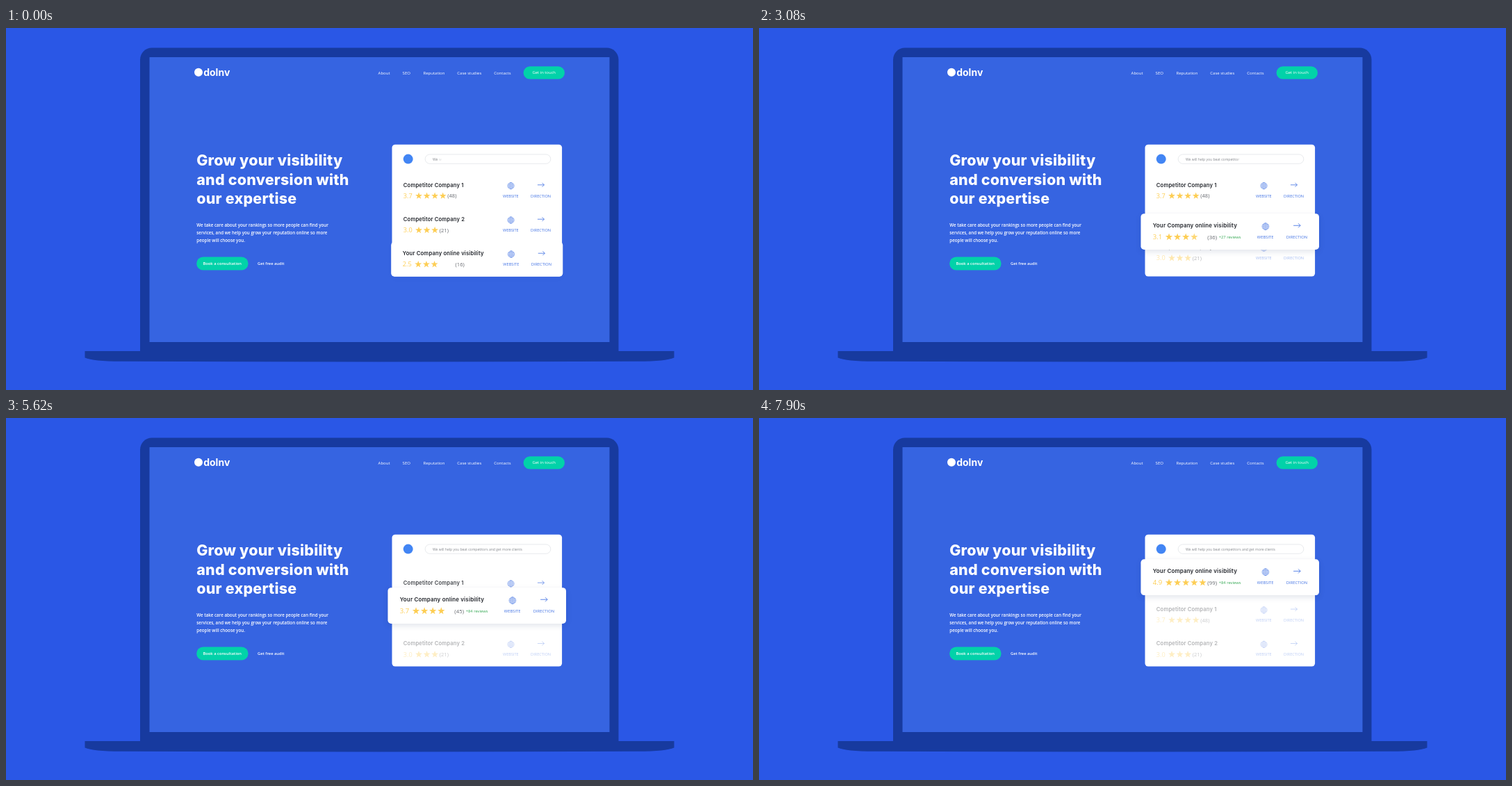
An HTML page with a canvas for the animation above (9100 ms loop, 1075 by 521 pixels).

```html
<!DOCTYPE html>
<html lang="en">
<head>
<meta charset="utf-8">
<title>Landing page on a laptop</title>
<style>
  html, body { margin: 0; width: 100%; height: 100%; overflow: hidden; background: #2a57e6; }
  canvas { display: block; width: 1075px; height: 521px; }
</style>
</head>
<body>
<canvas id="stage"></canvas>
<script>
const W = 1075, H = 521, LOOP = 9.1;
const canvas = document.getElementById('stage');
const ctx = canvas.getContext('2d');
const dpr = window.devicePixelRatio || 1;
canvas.width = W * dpr;
canvas.height = H * dpr;

const SANS = '"Open Sans", "Noto Sans", sans-serif';
const HEAD = 'Inter, "Open Sans", sans-serif';
const BLUE = '#3f70e3', GOLD = '#fdce55', GREEN = '#02d2a9', INK = '#25282e';
const QUERY = 'We will help you beat competitors and get more clients';
const MID = 677.75;        // horizontal centre of the results card
const GROWTH = 0.048;

// value over time: [seconds, value]
const SCORE = [[0, 2.5], [1.24, 2.63], [3.08, 3.13], [4.52, 3.5], [5.06, 3.6],
               [6.04, 3.82], [6.66, 4.13], [7.45, 4.8], [7.85, 4.9]];
const VOTES = [[0, 16], [1.24, 21.3], [3.08, 36.3], [4, 40.5], [4.52, 42.3],
               [5.06, 43.5], [6.04, 47.4], [6.66, 59.4], [7.4, 94], [7.85, 99]];

const clamp = x => Math.max(0, Math.min(1, x));
const linear = (t, from, to) => clamp((t - from) / (to - from));
function ease(t, from, to) {
  const x = linear(t, from, to);
  return x * x * (3 - 2 * x);
}
function sample(keys, t) {
  for (let i = 1; i < keys.length; i++) {
    const [t0, a] = keys[i - 1], [t1, b] = keys[i];
    if (t < t1) return a + (b - a) * linear(t, t0, t1);
  }
  return keys[keys.length - 1][1];
}

function text(str, x, y, size, color, o = {}) {
  ctx.font = `${o.weight || 400} ${size}px ${o.font || SANS}`;
  ctx.letterSpacing = (o.gap || 0) + 'px';
  ctx.textAlign = o.align || 'left';
  ctx.fillStyle = color;
  ctx.fillText(str, x, y);
}
function box(x, y, w, h, r, color) {
  ctx.beginPath();
  ctx.roundRect(x, y, w, h, r);
  ctx.fillStyle = color;
  ctx.fill();
}
function disc(x, y, r, color) {
  ctx.beginPath();
  ctx.arc(x, y, r, 0, Math.PI * 2);
  ctx.fillStyle = color;
  ctx.fill();
}
function star(x, y, r) {
  ctx.beginPath();
  for (let i = 0; i < 10; i++) {
    const a = i * Math.PI / 5 - Math.PI / 2, d = i % 2 ? r * 0.4 : r;
    ctx.lineTo(x + d * Math.cos(a), y + d * Math.sin(a));
  }
  ctx.closePath();
  ctx.fillStyle = GOLD;
  ctx.fill();
}
function globe(x, y, r) {
  ctx.beginPath();
  ctx.arc(x, y, r, 0, Math.PI * 2);
  ctx.moveTo(x + r * 0.5, y);
  ctx.ellipse(x, y, r * 0.5, r, 0, 0, Math.PI * 2);
  ctx.moveTo(x, y - r);
  ctx.lineTo(x, y + r);
  for (const k of [-0.45, 0, 0.45]) {
    const half = r * Math.sqrt(1 - k * k);
    ctx.moveTo(x - half, y + k * r);
    ctx.lineTo(x + half, y + k * r);
  }
  ctx.strokeStyle = BLUE;
  ctx.lineWidth = 0.5;
  ctx.stroke();
}
function arrow(x, y) {
  ctx.beginPath();
  ctx.moveTo(x - 4.8, y);
  ctx.lineTo(x + 4.7, y);
  ctx.moveTo(x + 1.8, y - 2.9);
  ctx.lineTo(x + 4.7, y);
  ctx.lineTo(x + 1.8, y + 2.9);
  ctx.strokeStyle = BLUE;
  ctx.lineWidth = 0.8;
  ctx.stroke();
}

// one search result, drawn around its own centre
function result(row) {
  const alpha = row.alpha ?? 1;
  ctx.globalAlpha = alpha;
  text(row.title, -105.9, -5.7, 7.6, INK, { weight: 600, font: HEAD, gap: 0.16 });
  text(row.score.toFixed(1), -106, 10.6, 9.2, GOLD);
  row.stars.forEach((shown, i) => {
    ctx.globalAlpha = alpha * shown;
    star(-83.7 + 11.55 * i, 7.4, 5.2);
  });
  ctx.globalAlpha = alpha;
  text(`(${row.votes})`, -88.4 + 11.5 * row.stars.length, 10, 7.5, '#66696f');
  globe(48.8, -7.1, 4.6);
  arrow(92, -8.4);
  text('WEBSITE', 48.6, 9.5, 5.6, BLUE, { align: 'center' });
  text('DIRECTION', 91.8, 9.5, 5.6, BLUE, { align: 'center' });
  if (row.gain) {
    ctx.globalAlpha = row.gainAlpha;
    text(row.gain, -15.3, 9.3, 5.55, '#34a853');
  }
  ctx.globalAlpha = 1;
}
function place(y, scale, draw) {
  ctx.save();
  ctx.translate(MID, y);
  ctx.scale(scale, scale);
  draw();
  ctx.restore();
}

function laptop() {
  ctx.fillStyle = '#2a57e6';
  ctx.fillRect(0, 0, W, H);
  box(193, 28.5, 688.5, 440, [17, 17, 0, 0], '#173a9f');
  ctx.beginPath();
  ctx.moveTo(113.5, 465);
  ctx.lineTo(961.5, 465);
  ctx.lineTo(961.5, 474.5);
  ctx.bezierCurveTo(953, 478.2, 937, 479.6, 910, 479.8);
  ctx.quadraticCurveTo(537, 481, 165, 479.8);
  ctx.bezierCurveTo(138, 479.6, 122, 478.2, 113.5, 474.5);
  ctx.fill();
  ctx.fillStyle = '#3664e1';
  ctx.fillRect(206.5, 42, 662, 410);
}

function page() {
  const white = '#fff';
  disc(277, 63.7, 6, white);
  text('dolnv', 284.2, 69, 14, white, { weight: 700, font: HEAD });
  [['About', 535.6], ['SEO', 570.6], ['Reputation', 600.5], ['Case studies', 649.3], ['Contacts', 702.2]]
    .forEach(([label, x]) => text(label, x, 67.3, 6, white, { weight: 500 }));
  box(744.6, 55.2, 59.4, 18.4, 9.2, GREEN);
  text('Get in touch', 774.2, 66.4, 5.9, white, { weight: 500, align: 'center' });

  ['Grow your visibility', 'and conversion with', 'our expertise'].forEach((line, i) =>
    text(line, 274.2, 198 + 27.7 * i, 21.5, white, { weight: 800, font: HEAD, gap: 0.2 }));
  ['We take care about your rankings so more people can find your',
   'services, and we help you grow your reputation online so more',
   'people will choose you.'].forEach((line, i) =>
    text(line, 274.3, 285.8 + 11.1 * i, 6.22, white, { weight: 600 }));
  box(274.2, 329.6, 74.4, 18.8, 9.4, GREEN);
  text('Book a consultation', 311.2, 341.2, 5.8, white, { weight: 600, align: 'center' });
  text('Get free audit', 362, 341.2, 5.8, white, { weight: 600 });
}

function search(t) {
  disc(578.7, 188.6, 7, '#4285f4');
  ctx.beginPath();
  ctx.roundRect(603.2, 181.9, 180.6, 13.4, 6.7);
  ctx.strokeStyle = '#dfe1e5';
  ctx.lineWidth = 0.7;
  ctx.stroke();

  const typed = Math.min(QUERY.length, 3.3 + 9.2 * t);
  const whole = Math.floor(typed), done = QUERY.slice(0, whole);
  const size = 5.06, grey = '#85888d';
  text(done, 614, 190.5, size, grey);
  if (whole < QUERY.length) {
    const x = 614 + ctx.measureText(done).width;
    ctx.globalAlpha = typed - whole;
    text(QUERY[whole], x, 190.5, size, grey);
    ctx.globalAlpha = 1;
  }
}

function results(t) {
  const fall2 = ease(t, 1.63, 3.63), fall1 = ease(t, 5, 7);
  const rise = ease(t, 1.71, 3.71) + ease(t, 5.03, 7.03);
  const grow = ease(t, -0.64, 1.63);

  box(555.5, 167.7, 244.6, 189.8, 4.6, '#fff');
  search(t);
  place(234.2 + 49.3 * fall1, 1, () => result({
    title: 'Competitor Company 1', score: 3.7, votes: 48,
    stars: [1, 1, 1, 1], alpha: 1 - 0.65 * fall1
  }));
  place(283.6 + 49.3 * fall2, 1, () => result({
    title: 'Competitor Company 2', score: 3, votes: 21,
    stars: [1, 1, 1], alpha: 1 - 0.65 * fall2
  }));

  place(332.7 - 51.75 * rise, 1 + GROWTH * grow, () => {
    ctx.shadowColor = `rgba(20, 40, 90, ${0.12 * grow})`;
    ctx.shadowBlur = 9 * dpr;
    ctx.shadowOffsetY = 3 * dpr;
    box(-122.4, -24.7, 244.8, 49.4, 4.6, '#fff');
    ctx.shadowColor = 'transparent';
    result({
      title: 'Your Company online visibility',
      score: Math.floor(sample(SCORE, t) * 10 + 0.001) / 10,
      votes: Math.floor(sample(VOTES, t) + 0.001),
      stars: [1, 1, 1, linear(t, 2.6, 3.2), linear(t, 5.75, 6.25)],
      gain: t < 5.5 ? '+27 reviews' : '+84 reviews',
      gainAlpha: linear(t, 2.3, 2.8)
    });
  });
}

function frame(now) {
  const t = (now / 1000) % LOOP;
  ctx.setTransform(dpr, 0, 0, dpr, 0, 0);
  laptop();
  page();
  results(t);
}

const start = performance.now();
function tick() {
  frame(performance.now() - start);
  requestAnimationFrame(tick);
}
tick();
</script>
</body>
</html>
```
